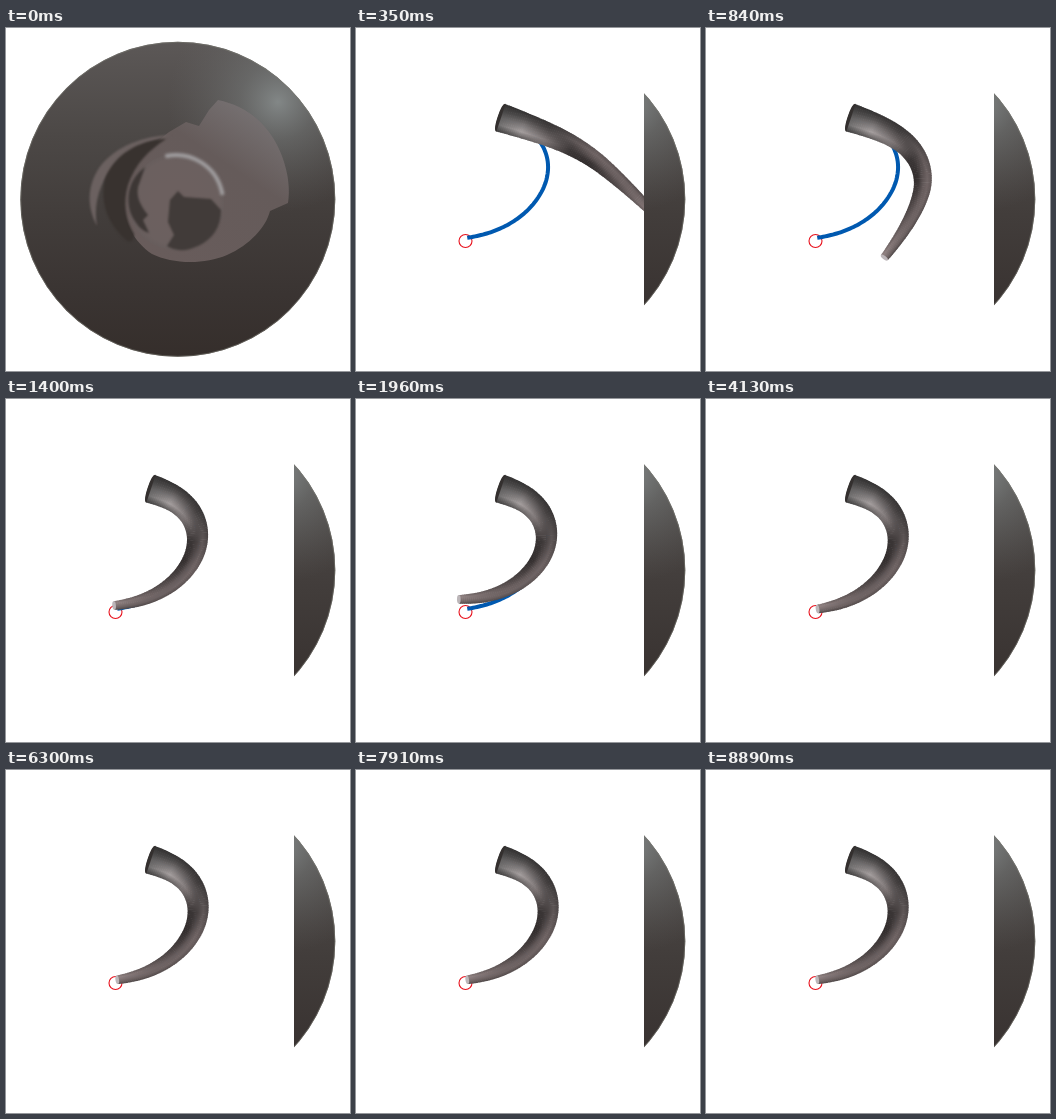
Recreate the animation shown at these times as an HTML page with a canvas. Size 344 by 343 pixels, loop 8960 ms.

```html
<!DOCTYPE html>
<html lang="en">
<head>
<meta charset="utf-8">
<title>Bending rod</title>
<style>
html, body { margin: 0; width: 100%; height: 100%; overflow: hidden; background: #fff; }
canvas { display: block; width: 344px; height: 343px; }
</style>
</head>
<body>
<canvas id="stage" width="344" height="343"></canvas>
<script>
const ctx = document.getElementById('stage').getContext('2d');
const LOOP = 8960, STEP = 70, W = 344, H = 343, VIEW_W = 288;
const LENGTH = 190, SLICES = 95, BASE = { x: 145, y: 89.8 }, BASE_ANGLE = 18.5;
const MID_LEVEL = 0.706;

// Turning angle in degrees at even steps along the rod
const MID_BEND = [0, 2, 8, 20, 40, 63, 87, 97, 103, 107, 110];
const END_BEND = [0, 7, 26, 51, 76, 97, 112, 125, 136, 146, 153];

// Brightness across the rod, inner to outer edge, at places along it
const SHADES = [
  [0, 62, 115, 100, 70, 48],
  [0.12, 90, 165, 128, 82, 50],
  [0.25, 112, 128, 96, 68, 54],
  [0.4, 56, 58, 72, 96, 78],
  [0.52, 48, 56, 92, 112, 96],
  [0.72, 76, 92, 108, 110, 84],
  [0.92, 104, 132, 124, 106, 76],
  [1, 140, 148, 130, 112, 80]
];

const lerp = (a, b, k) => a + (b - a) * k;

function sample(list, u) {
  const p = u * (list.length - 1), i = Math.min(Math.floor(p), list.length - 2);
  return lerp(list[i], list[i + 1], p - i);
}

// Damped step response
function bendLevel(sec) {
  const decay = 1.65, omega = 1.83;
  return 1 - Math.exp(-decay * sec) *
    (Math.cos(omega * sec) + decay / omega * Math.sin(omega * sec));
}

function bendAt(u, level) {
  const mid = sample(MID_BEND, u), end = sample(END_BEND, u);
  if (level < MID_LEVEL) return mid * level / MID_LEVEL;
  if (level < 1) return lerp(mid, end, (level - MID_LEVEL) / (1 - MID_LEVEL));
  return end * level;
}

function centreLine(level) {
  const pts = [], ds = LENGTH / SLICES;
  let { x, y } = BASE;
  for (let i = 0; i <= SLICES; i++) {
    const u = i / SLICES;
    const angle = (BASE_ANGLE + bendAt(u, level)) * Math.PI / 180;
    const half = lerp(14.4, 4.3, u);
    const nx = Math.sin(angle) * half, ny = -Math.cos(angle) * half;
    pts.push({ x, y, u, angle, half, nx, ny });
    x += Math.cos(angle) * ds;
    y += Math.sin(angle) * ds;
  }
  return pts;
}

function shadeRow(u) {
  let i = 0;
  while (i < SHADES.length - 2 && u > SHADES[i + 1][0]) i++;
  const a = SHADES[i], b = SHADES[i + 1], k = (u - a[0]) / (b[0] - a[0]);
  return a.slice(1).map((g, j) => lerp(g, b[j + 1], k));
}

function tone(g, u) {
  const warm = lerp(0.02, 0.1, Math.min(1, u * 2));
  return `rgb(${g},${g * (1 - warm)},${g * (1 - warm)})`;
}

function fillEllipse(x, y, rx, ry, angle, color) {
  ctx.fillStyle = color;
  ctx.beginPath();
  ctx.ellipse(x, y, rx, ry, angle, 0, Math.PI * 2);
  ctx.fill();
}

function drawRod(level) {
  const pts = centreLine(level), base = pts[0], tip = pts[SLICES];
  fillEllipse(base.x, base.y, 3.2, base.half, base.angle, '#34302f');
  for (let i = 0; i < SLICES; i++) {
    const a = pts[i], b = pts[i + 1];
    const over = i < SLICES - 1 ? 0.6 : 0;
    const ox = Math.cos(b.angle) * over, oy = Math.sin(b.angle) * over;
    const fill = ctx.createLinearGradient(a.x - a.nx, a.y - a.ny, a.x + a.nx, a.y + a.ny);
    shadeRow(a.u).forEach((g, j, row) => fill.addColorStop(j / (row.length - 1), tone(g, a.u)));
    ctx.fillStyle = fill;
    ctx.beginPath();
    ctx.moveTo(a.x - a.nx, a.y - a.ny);
    ctx.lineTo(a.x + a.nx, a.y + a.ny);
    ctx.lineTo(b.x + b.nx + ox, b.y + b.ny + oy);
    ctx.lineTo(b.x - b.nx + ox, b.y - b.ny + oy);
    ctx.fill();
  }
  ctx.strokeStyle = '#34302f';
  ctx.lineWidth = 1.4;
  ctx.beginPath();
  ctx.ellipse(base.x, base.y, 2.8, base.half - 0.5, base.angle, Math.PI / 2, Math.PI * 1.5);
  ctx.stroke();
  fillEllipse(tip.x, tip.y, 1.8, tip.half, tip.angle, '#bcb6b9');
}

function drawGoal() {
  ctx.strokeStyle = '#e8101c';
  ctx.lineWidth = 1.1;
  ctx.beginPath();
  ctx.arc(109.5, 213, 6.5, 0, Math.PI * 2);
  ctx.stroke();
  ctx.strokeStyle = '#0059b0';
  ctx.lineWidth = 4;
  ctx.beginPath();
  centreLine(1).forEach(p => ctx.lineTo(p.x, p.y));
  ctx.stroke();
}

function gradient(g, stops) {
  stops.forEach(([at, color]) => g.addColorStop(at, color));
  return g;
}

function fillPath(d, color, blur = 0) {
  ctx.filter = blur ? `blur(${blur}px)` : 'none';
  ctx.fillStyle = color;
  ctx.fill(new Path2D(d));
  ctx.filter = 'none';
}

function drawDisc() {
  ctx.save();
  ctx.beginPath();
  ctx.arc(171.8, 171.3, 157.5, 0, Math.PI * 2);
  ctx.clip();
  ctx.fillStyle = gradient(ctx.createLinearGradient(0, 13, 0, 330),
    [[0, '#5c5857'], [0.3, '#4c4846'], [0.55, '#423d3b'], [0.8, '#3a3432'], [1, '#352e2b']]);
  ctx.fillRect(0, 0, W, H);
  ctx.fillStyle = gradient(ctx.createRadialGradient(272, 74, 0, 272, 74, 110),
    [[0, 'rgba(139,145,145,.85)'], [0.35, 'rgba(120,124,124,.5)'], [1, 'rgba(100,100,100,0)']]);
  ctx.fillRect(0, 0, W, H);

  const warm = gradient(ctx.createLinearGradient(250, 80, 150, 230),
    [[0, '#777273'], [0.35, '#655b5a'], [1, '#685c5b']]);
  fillPath('M163 104L180 94L193 98L203 82L212 72C242 78 265 98 276 128' +
    'C283 147 284 163 282 175L264 183C260 199 244 217 221 227C198 237 166 236 146 226' +
    'C128 214 119 195 117 177C116 153 126 131 144 119Z', warm, 0.7);
  fillPath('M165 107C139 108 110 117 93 140C82 157 80 177 91 198' +
    'C88 181 91 162 102 146C116 126 138 116 165 107Z', '#6b6160', 0.8);
  fillPath('M160 111C132 112 108 127 99 151C94 171 100 194 119 211' +
    'C124 216 128 213 128 206C119 191 117 174 122 157C129 136 143 122 160 111Z', '#38322f', 1.2);

  ctx.fillStyle = gradient(ctx.createRadialGradient(170, 174, 20, 170, 174, 50),
    [[0, '#6c605f'], [0.75, '#6b605f'], [1, '#655c5b']]);
  ctx.beginPath();
  ctx.arc(170, 174, 48, 0, Math.PI * 2);
  ctx.fill();
  fillPath('M139 139C124 150 119 168 125 186C130 197 136 203 143 205L137 192L142 187' +
    'C135 178 130 170 132 159Z', '#3d3735', 1);
  fillPath('M164 172L172 163L178 169L205 171L215 182C215 199 207 211 192 218' +
    'C179 224 169 223 161 218L168 207L162 194Z', '#413b39', 1);

  ctx.filter = 'blur(1.5px)';
  ctx.lineWidth = 4;
  ctx.strokeStyle = 'rgba(180,181,183,.75)';
  ctx.beginPath();
  ctx.arc(170, 174, 47, -1.8, -0.15);
  ctx.stroke();
  ctx.filter = 'none';
  ctx.restore();

  ctx.strokeStyle = 'rgba(120,120,112,.6)';
  ctx.lineWidth = 1;
  ctx.beginPath();
  ctx.arc(171.8, 171.3, 157, 0, Math.PI * 2);
  ctx.stroke();
}

function render(ms) {
  const t = Math.floor((ms % LOOP) / STEP) * STEP;
  ctx.fillStyle = '#fff';
  ctx.fillRect(0, 0, W, H);
  drawDisc();
  if (t < STEP) return;
  ctx.save();
  ctx.beginPath();
  ctx.rect(0, 0, VIEW_W, H);
  ctx.clip();
  ctx.fillStyle = '#fff';
  ctx.fillRect(0, 0, VIEW_W, H);
  drawGoal();
  drawRod(bendLevel((t - STEP) / 1000));
  ctx.restore();
}

const start = performance.now();
function tick() {
  render(performance.now() - start);
  requestAnimationFrame(tick);
}
tick();
</script>
</body>
</html>
```
